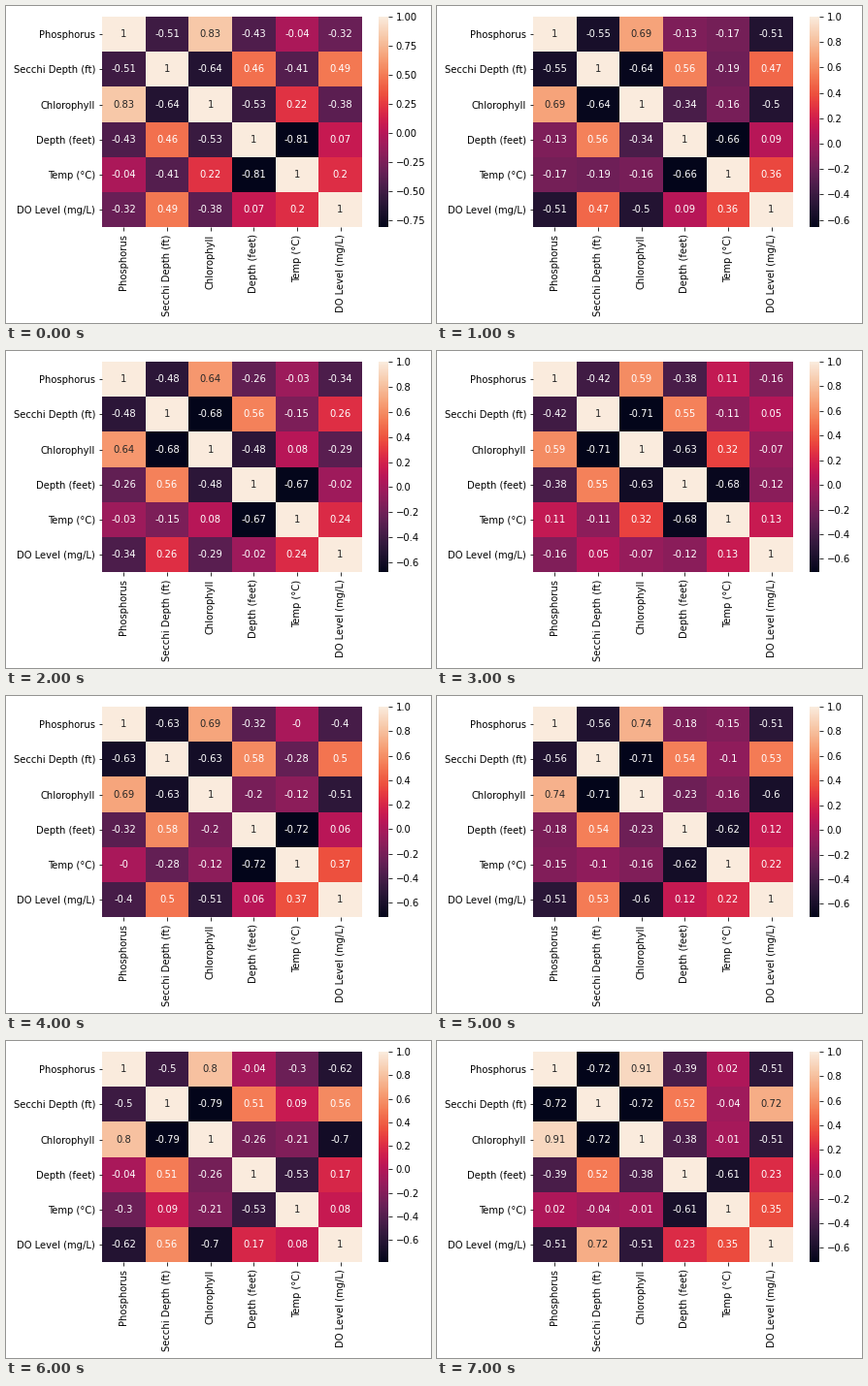
Write a matplotlib script that moves like this. It is 438x327 px and loops after 8000 ms.

```python
import numpy as np
import matplotlib.pyplot as plt
from matplotlib.animation import FuncAnimation
from matplotlib.colors import LinearSegmentedColormap

W, H, DPI = 438, 327, 72
LEFT, TOP, MAP_W, MAP_H = 99, 11, 267.84, 217.44
BAR_LEFT, BAR_W = 383.58, 10.872

plt.rcParams.update({"font.family": "DejaVu Sans", "font.size": 10})

LABELS = ["Phosphorus", "Secchi Depth (ft)", "Chlorophyll",
          "Depth (feet)", "Temp (°C)", "DO Level (mg/L)"]
N = len(LABELS)

# Upper triangles of the correlation matrices, row by row
A = [-.51, .83, -.43, -.04, -.32, -.64, .46, -.41, .49, -.53, .22, -.38, -.81, .07, .2]
B = [-.55, .69, -.13, -.17, -.51, -.64, .56, -.19, .47, -.34, -.16, -.5, -.66, .09, .36]
C = [-.42, .59, -.38, .11, -.16, -.71, .55, -.11, .05, -.63, .32, -.07, -.68, -.12, .13]
D = [-.63, .69, -.32, -0., -.4, -.63, .58, -.28, .5, -.2, -.12, -.51, -.72, .06, .37]
E = [-.5, .8, -.04, -.3, -.62, -.79, .51, .09, .56, -.26, -.21, -.7, -.53, .17, .08]
F = [-.72, .91, -.39, .02, -.51, -.72, .52, -.04, .72, -.38, -.01, -.51, -.61, .23, .35]


def between(p, q):
    return np.round(np.add(p, q) / 2, 2)


STEPS = [A, B, between(B, C), C, D, between(D, E), E, F]

# Dark violet to cream, sampled at several even spacings
RAMPS = [
    "03051A 221331 451C47 6A1F56 921C5B B91657 D92847 ED513E F47C56 F6A47B F7C9AA FAEBDD",
    "03051A 35193E 701F57 AD1759 E13342 F37651 F6B48F FAEBDD",
    "03051A 4C1D4B A11A5B E83F3F F69C73 FAEBDD",
    "03051A 611F53 CB1B4F F4875E FAEBDD",
]
stops = {}
for ramp in RAMPS:
    colours = ramp.split()
    for i, c in enumerate(colours):
        stops[i / (len(colours) - 1)] = "#" + c
CMAP = LinearSegmentedColormap.from_list("heat", sorted(stops.items()), N=256)


def matrix(upper):
    m = np.eye(N)
    rows, cols = np.triu_indices(N, 1)
    m[rows, cols] = m[cols, rows] = upper
    return m


def text_colour(rgba):
    rgb = np.array(rgba[:3])
    linear = np.where(rgb <= .03928, rgb / 12.92, ((rgb + .055) / 1.055) ** 2.4)
    return ".15" if linear @ [.2126, .7152, .0722] > .408 else "w"


def add_axes(left, width):
    return fig.add_axes([left / W, 1 - (TOP + MAP_H) / H, width / W, MAP_H / H])


fig = plt.figure(figsize=(W / DPI, H / DPI), dpi=DPI, facecolor="white")


def draw(step):
    fig.clear()
    m = matrix(STEPS[step])
    ax = add_axes(LEFT, MAP_W)
    mesh = ax.pcolormesh(m, cmap=CMAP, vmin=m.min(), vmax=1)
    ax.set(xlim=(0, N), ylim=(N, 0))
    ax.spines[:].set_visible(False)
    centres = np.arange(N) + .5
    ax.set_xticks(centres, LABELS, rotation="vertical")
    ax.set_yticks(centres, LABELS)
    for (row, col), value in np.ndenumerate(m):
        ax.text(col + .5, row + .5, f"{value:.2g}", ha="center", va="center",
                color=text_colour(CMAP(mesh.norm(value))))
    bar = fig.colorbar(mesh, cax=add_axes(BAR_LEFT, BAR_W))
    bar.outline.set_linewidth(0)
    return []


anim = FuncAnimation(fig, draw, frames=len(STEPS), init_func=lambda: [],
                     interval=1000, repeat=True, repeat_delay=0)
plt.show()
```
